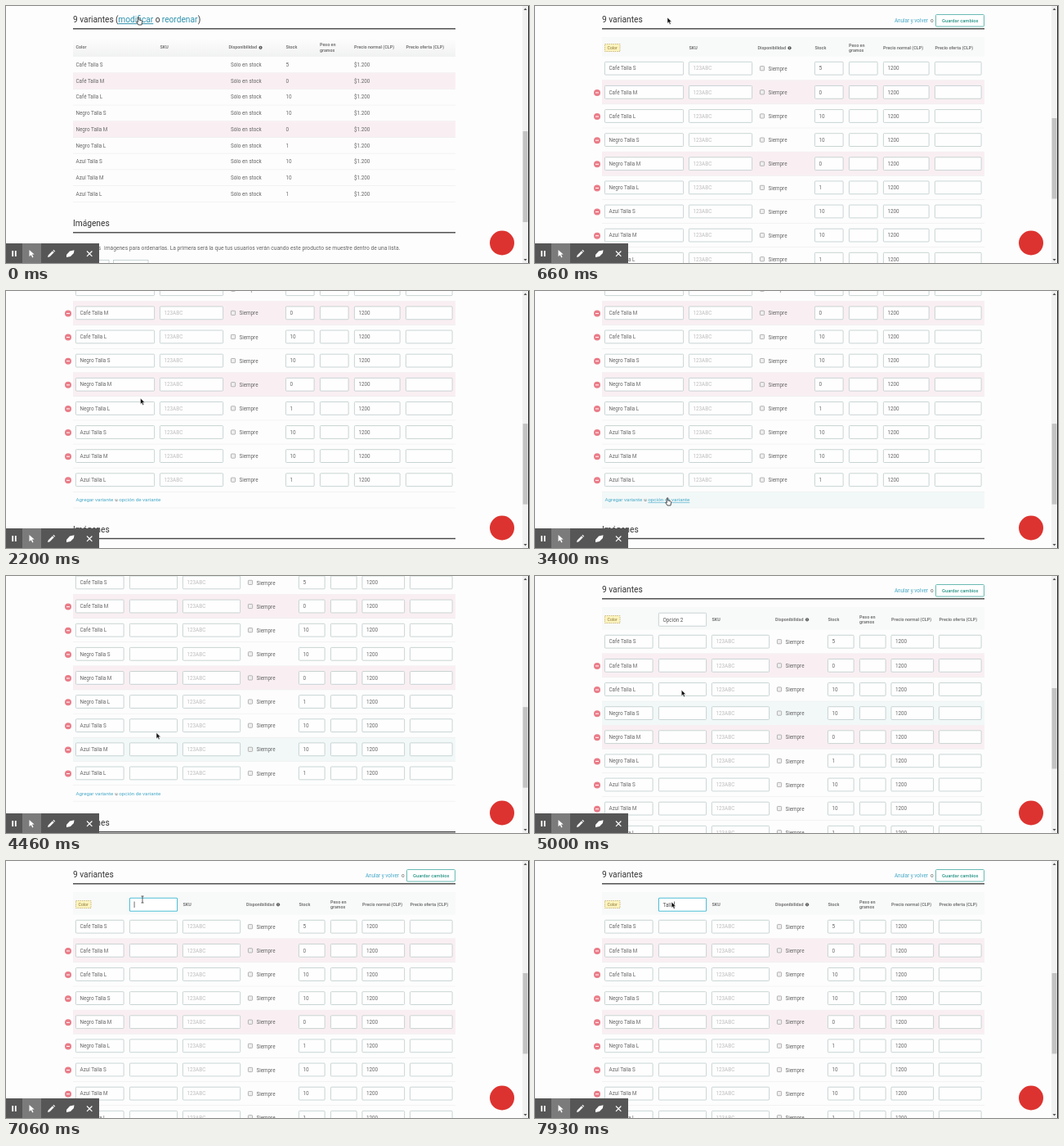
These frames come from a looping animation (640x314 px, 8 s). An HTML page:

```html
<!DOCTYPE html>
<html lang="es">
<head>
<meta charset="utf-8">
<title>Variantes</title>
<style>
html, body { margin: 0; width: 100%; height: 100%; overflow: hidden; background: #fdfdfd; }
svg { display: block; width: 640px; height: 314px; font-family: Roboto, Arial, sans-serif; }
text { white-space: pre; }
.head { font-weight: 700; fill: #777; }
.link { fill: #45a9c8; }
.field { fill: #fefefe; stroke: #bccaca; stroke-width: .8; }
</style>
</head>
<body>
<svg id="stage" viewBox="0 0 640 314"></svg>
<script>
const LOOP = 8000, STEP = 29.13;
const EDIT_AT = 200, ADD_AT = 3600, FOCUS_AT = 5500;
const names = ['Café', 'Negro', 'Azul'].flatMap(c => ['S', 'M', 'L'].map(s => `${c} Talla ${s}`));
const stock = [5, 0, 10, 10, 0, 1, 10, 10, 1];

// y is the vertical middle of the text
const text = (x, y, s, size = 6.3, attrs = 'fill="#666"') =>
  `<text x="${x}" y="${y + size * .36}" font-size="${size}" ${attrs}>${s}</text>`;
const rect = (x, y, w, h, attrs) => `<rect x="${x}" y="${y}" width="${w}" height="${h}" ${attrs}/>`;
const field = (x, right, y, s = '', color = '#666') =>
  rect(x + .4, y - 7.9, right - x - .8, 15.8, 'rx="1" class="field"') +
  (s === '' ? '' : text(x + 5.5, y, s, 6.3, `fill="${color}"`));
const title = (y, s) => text(82, y, s, 10.2, 'fill="#333"') + rect(82, y + 10.6, 468, 1.4, 'fill="#444"');
const rowBack = (y, h, i) =>
  (stock[i] ? '' : rect(82, y - h / 2, 468, h, 'fill="#f9eff2"')) +
  rect(82, y + h / 2 - .3, 468, .6, 'fill="#ececec"');

function headers(y, cols) {
  const [sku, avail, qty, weight, price, offer] = cols;
  const head = (x, dy, s) => text(x, y + dy, s, 5.4, 'class="head"');
  return head(sku, 0, 'SKU') + head(avail, 0, 'Disponibilidad') +
    `<circle cx="${avail + 39}" cy="${y + .3}" r="2.1" fill="#555"/>` +
    rect(avail + 38.7, y - .9, .6, 2.4, 'fill="#fff"') +
    head(qty, 0, 'Stock') + head(weight, -3, 'Peso en') + head(weight, 3.5, 'gramos') +
    head(price, 0, 'Precio normal (CLP)') + head(offer, 0, 'Precio oferta (CLP)');
}

function listView() {
  const blue = 'fill="#2f93ae"';
  let s = title(16.5, '9 variantes') + text(134, 16.5, '(', 10.2, 'fill="#333"') +
    text(137.3, 16.5, 'modificar', 10.2, blue + ' text-decoration="underline"') +
    text(182.8, 16.5, 'o', 10.2, 'fill="#333"') + text(190.8, 16.5, 'reordenar', 10.2, blue) +
    text(234.8, 16.5, ')', 10.2, 'fill="#333"') +
    rect(82, 40, 468, 22, 'fill="url(#bar)"') + text(85.5, 50.5, 'Color', 5.4, 'class="head"') +
    headers(50.5, [188.5, 272.5, 342.5, 384, 426, 489.5]);
  names.forEach((name, i) => {
    const y = 71.8 + 19.7 * i;
    s += rowBack(y, 19.7, i) + text(85.5, y, name) + text(275, y, 'Sólo en stock') +
      text(342.5, y, stock[i]) + text(426, y, '$1.200');
  });
  return s + title(265.5, 'Imágenes') +
    text(82, 295.5, 'Arrastra las', 6.7) +
    text(120, 295.5, 'imágenes para ordenarlas. La primera será la que tus usuarios verán cuando este producto se muestre dentro de una lista.', 6.7) +
    rect(82, 310.4, 44, 10, 'class="field"') + rect(131.5, 310.4, 42.5, 10, 'class="field"');
}

// c: column edges and label positions; top: middle of the first row
function editView(id, top, headY, c) {
  let s = title(16.5, '9 variantes') + text(440, 17.3, 'Anular y volver', 6.3, 'class="link"') +
    text(484, 17.3, 'o') +
    rect(490.5, 10.5, 59, 14.5, 'rx="1" fill="#fff" stroke="#58b3ac" stroke-width=".9"') +
    text(498, 17.6, 'Guardar cambios', 5.8, 'fill="#279486" font-weight="500"') +
    rect(82, 38, 468, top - 14.5 - 38, 'fill="#f8f9f9"') +
    rect(85.5, headY - 4.5, 18.5, 9, 'fill="#fdf3bd" stroke="#b9a560" stroke-width=".7" stroke-dasharray="1.5 1"') +
    text(88.5, headY, 'Color', 5.2, 'fill="#8a7a3c"') + headers(headY, c.heads) +
    `<rect id="${id}Hover" x="82" width="468" fill="#f2f8f8"/>`;
  names.forEach((name, i) => {
    const y = top + STEP * i;
    s += rowBack(y, STEP, i) + field(85, c.name, y, name) + (c.option ? field(...c.option, y) : '') +
      field(...c.sku, y, '123ABC', '#bdbdbd') +
      rect(c.check, y - 2.6, 5.2, 5.2, 'rx=".8" fill="#eee" stroke="#999" stroke-width=".7"') +
      text(c.check + 10, y + .4, 'Siempre') + field(...c.qty, y, stock[i]) +
      field(...c.weight, y) + field(...c.price, y, 1200) + field(...c.offer, y);
    if (i) s += `<circle cx="76" cy="${y + .6}" r="4" fill="#ea7c88"/>` + rect(74, y + .1, 4, 1, 'fill="#fff"');
  });
  const y = top + 257.5;
  return s + text(85.5, y, 'Agregar variante', 6.25, 'class="link"') + text(133.2, y, 'u', 6.25) +
    text(138.3, y, 'opción de variante', 6.25, `class="link" id="${id}Link"`) +
    rect(82, y + 9.5, 468, .6, 'fill="#ececec"') + title(top + 293.5, 'Imágenes');
}

const two = {
  name: 182, sku: [188, 266], check: 275.4, qty: [342, 377.5], weight: [384, 419.5],
  price: [426, 482.5], offer: [489, 546.5], heads: [188.5, 272.5, 342.5, 384, 426, 489.5]
};
const three = {
  name: 144.5, option: [151, 210], sku: [216, 287], check: 296.4, qty: [358, 390.5], weight: [397, 429.5],
  price: [435.5, 488], offer: [494, 546.5], heads: [216.5, 294, 358.5, 397, 436, 494.5]
};

const toolbar = rect(0, 290, 114, 24, 'fill="#565656"') + rect(20, 290, 23, 24, 'fill="#7b7b7b"') +
  `<g fill="#fff"><path d="M7.3 299h1.8v7H7.3zM10.9 299h1.8v7h-1.8z"/>
  <path d="M28.5 298l6.2 5.4-2.8.2 1.6 3.2-1.2.6-1.6-3.2-2.2 1.8z"/>
  <path d="M51 307l.7-2.6 5.2-5.2 1.9 1.9-5.2 5.2zM57.5 298.600l.8-.8 1.900 1.900-.8.8z"/>
  <path d="M74 304l4-4.500 5.500-1.200-.6 3.700-4 4-4.900 1z"/></g>
  <path d="M99 299.500l6.400 6.400m0-6.400l-6.400 6.400" stroke="#fff" stroke-width="1.200"/>`;

const pointers = {
  arrow: '<path d="M0 0v7.200l1.700-1.500 1.200 2.700 1.300-.6-1.200-2.600h2.300z" fill="#111" stroke="#fff" stroke-width=".5"/>',
  hand: '<path d="M-.6 0q.8-.8 1.500 0v3l3 .8q.9.400.7 1.500l-.6 3.700h-4L-2.300 5.600q0-1.200 1.700 0z" fill="#fff" stroke="#222" stroke-width=".8"/>',
  beam: '<path d="M-1.500-4H1.500M0-4V4M-1.500 4H1.500" fill="none" stroke="#333" stroke-width=".8"/>'
};

stage.innerHTML = `<defs><linearGradient id="bar" x2="0" y2="1"><stop stop-color="#fdfdfd"/><stop offset="1" stop-color="#f1f2f2"/></linearGradient></defs>
  <rect width="640" height="314" fill="#fdfdfd"/>
  <g id="list">${listView()}</g>
  <g id="edit">${editView('edit', 76.2, 51, two)}</g>
  <g id="wide">${editView('wide', 80.2, 53, three)}
    <rect id="box" x="151.400" y="45.200" width="58.200" height="16" rx="1" fill="#fff"/>
    <text id="typed" x="156.500" y="55.500" font-size="6.300" fill="#555"></text>
    <rect id="caret" y="49.500" width=".7" height="7.500" fill="#333"/></g>
  ${rect(632, 0, 7, 314, 'fill="#f1f1f1"')}
  <path d="M633.500 5l2-2.500 2 2.500zM633.500 309l2 2.500 2-2.500z" fill="#555"/>
  <rect id="thumb" x="632.500" width="6" fill="#c3c3c3"/>
  ${rect(639, 0, 1, 314, 'fill="#222"')}
  <circle cx="607" cy="289.500" r="15" fill="#dd3330"/>
  ${toolbar}<g id="pointer"></g>`;

const el = id => document.getElementById(id);
const show = (node, on) => node.setAttribute('display', on ? 'inline' : 'none');
const set = (node, attrs) => { for (const k in attrs) node.setAttribute(k, attrs[k]); };

function track(keys, t, col = 1) {
  const i = keys.findIndex(k => k[0] > t);
  if (i < 0) return keys[keys.length - 1][col];
  if (!i) return keys[0][col];
  const a = keys[i - 1], b = keys[i];
  return a[col] + (b[col] - a[col]) * (t - a[0]) / (b[0] - a[0]);
}

const path = [[0, 162, 14], [930, 162, 14], [1300, 182, 77], [1650, 182, 77], [2200, 164.5, 131],
  [2300, 164.5, 131], [3060, 162, 253], [4130, 162, 253], [4460, 184, 191.5], [4900, 182, 160],
  [5450, 167, 47], [7400, 167, 47], [7800, 167, 50]];
const scroll = [[1650, 0], [1850, 38], [2150, 78.5], [4400, 78.5], [4460, 72.5], [4700, 26], [4900, 0]];
const shapes = [[0, 'hand'], [EDIT_AT, 'arrow'], [1230, 'beam'], [1700, 'arrow'], [3000, 'hand'],
  [ADD_AT, 'arrow'], [5350, 'beam'], [7600, 'arrow']];
const erase = [6060, 6200, 6260, 6400, 6600, 6670, 6730, 7060];
const type = [7200, 7400, 7530, 7660, 7800];
const count = (times, t) => times.filter(k => k <= t).length;

let shape;
function draw(now) {
  const t = now % LOOP, editing = t >= EDIT_AT, added = t >= ADD_AT, offset = track(scroll, t);
  show(list, !editing);
  show(edit, editing && !added);
  show(wide, added);

  const id = added ? 'wide' : 'edit', top = added ? 80.2 : 76.2;
  set(el(id), { transform: `translate(0 ${-offset})` });
  set(thumb, editing ? { y: 137 + offset * .32, height: 98.5 } : { y: 153, height: 111 });

  // the highlighted row trails the pointer a little
  const row = Math.round((track(path, t - 100, 2) + offset - top) / STEP);
  const onLink = row > 8, hover = el(id + 'Hover');
  show(hover, row >= 0 && row <= 9);
  set(hover, onLink ? { y: top + 248, height: 19 } : { y: top + STEP * (row - .5), height: STEP });
  set(el(id + 'Link'), { 'text-decoration': onLink ? 'underline' : 'none' });

  const focused = t >= FOCUS_AT;
  typed.textContent = t < type[0] ? 'Opción 2'.slice(0, 8 - count(erase, t)) : 'Talla'.slice(0, count(type, t));
  set(box, { stroke: focused ? '#4fc0d8' : '#bccaca', 'stroke-width': focused ? 1.1 : .8 });
  show(caret, focused);
  if (added) set(caret, { x: 156.7 + typed.getComputedTextLength() });

  const next = shapes.filter(k => k[0] <= t).pop()[1];
  if (next !== shape) pointer.innerHTML = pointers[shape = next];
  set(pointer, { transform: `translate(${track(path, t)} ${track(path, t, 2)})` });
}

const start = performance.now();
function tick() {
  draw(performance.now() - start);
  requestAnimationFrame(tick);
}
tick();
</script>
</body>
</html>
```
